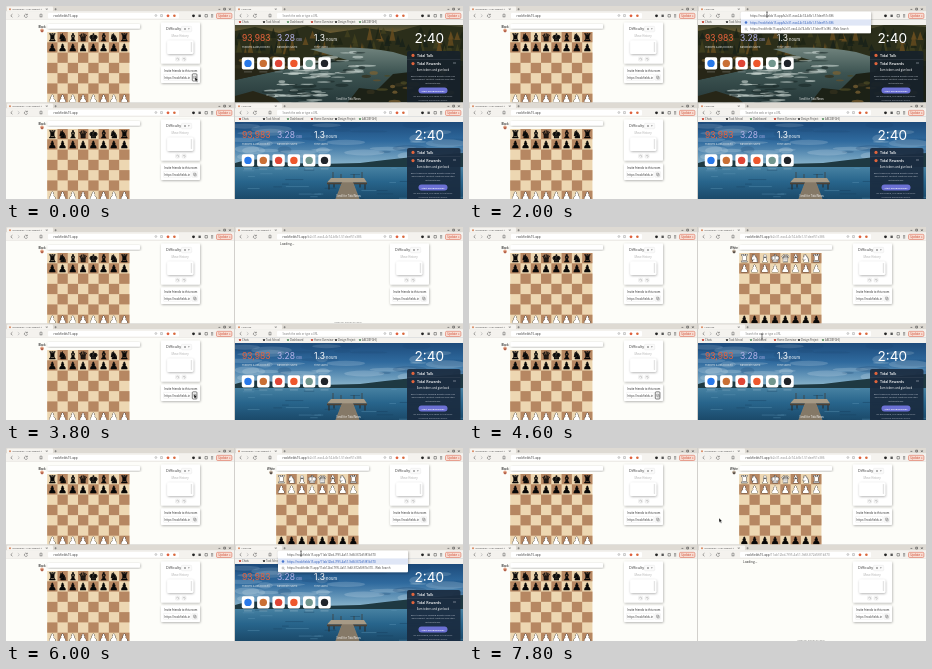
An HTML page that plays this animation: 457 by 193 pixels, repeating every 8000 ms.

```html
<!DOCTYPE html>
<html lang="en">
<head>
<meta charset="utf-8">
<title>Four windows</title>
<style>
html, body { margin: 0; width: 100%; height: 100%; overflow: hidden; background: #fdfdf9; }
svg { display: block; width: 100vw; height: 100vh; }
text { font-family: "Open Sans", "Noto Sans", sans-serif; white-space: pre; }
.stat { font-family: Inter, sans-serif; }
.piece { font-family: "DejaVu Sans", sans-serif; }
</style>
</head>
<body>
<svg id="stage" viewBox="0 0 457 193" preserveAspectRatio="none">
  <defs>
    <clipPath id="frame"><rect width="228" height="96.5"/></clipPath>
    <clipPath id="view"><rect y="13.5" width="228" height="83"/></clipPath>
    <linearGradient id="dusk" x2="0" y2="1">
      <stop offset="0" stop-color="#2c3a35"/><stop offset=".6" stop-color="#5e5430"/><stop offset="1" stop-color="#8a6a30"/>
    </linearGradient>
    <linearGradient id="river" x2="0" y2="1">
      <stop offset="0" stop-color="#70837d"/><stop offset=".4" stop-color="#3d5452"/><stop offset="1" stop-color="#1f3032"/>
    </linearGradient>
    <linearGradient id="sky" x2="0" y2="1">
      <stop offset="0" stop-color="#17406f"/><stop offset=".5" stop-color="#2f6a9e"/><stop offset="1" stop-color="#8db7cd"/>
    </linearGradient>
    <linearGradient id="lake" x2="0" y2="1">
      <stop offset="0" stop-color="#4d87a6"/><stop offset=".4" stop-color="#28658c"/><stop offset="1" stop-color="#143b58"/>
    </linearGradient>
    <filter id="soft" x="-10%" y="-20%" width="120%" height="150%">
      <feDropShadow dx=".5" dy=".8" stdDeviation=".9" flood-opacity=".32"/>
    </filter>
  </defs>
</svg>
<script>
const NS = 'http://www.w3.org/2000/svg';
const stage = document.getElementById('stage');
const LOOP = 8000, STEP = 200;
const SITE = 'rookfields15.app';
const TITLE = 'Rookfields - Play against t';

function el(parent, tag, attrs = {}, content) {
  const node = document.createElementNS(NS, tag);
  for (const key in attrs) node.setAttribute(key, attrs[key]);
  if (content !== undefined) node.textContent = content;
  return parent.appendChild(node);
}
const group = (p, attrs) => el(p, 'g', attrs);
const rect = (p, x, y, width, height, fill, more) => el(p, 'rect', { x, y, width, height, fill, ...more });
const dot = (p, cx, cy, r, fill, more) => el(p, 'circle', { cx, cy, r, fill, ...more });
const blob = (p, cx, cy, rx, ry, fill, opacity) => el(p, 'ellipse', { cx, cy, rx, ry, fill, opacity });
const path = (p, d, fill, more) => el(p, 'path', { d, fill, ...more });
const line = (p, d, stroke, width = 0.5) => path(p, d, 'none', { stroke, 'stroke-width': width });
const text = (p, x, y, size, fill, str, more) => el(p, 'text', { x, y, 'font-size': size, fill, ...more }, str);
const MID = { 'text-anchor': 'middle' };
const show = (node, on) => node.setAttribute('visibility', on ? 'inherit' : 'hidden');

function rng(seed) {
  return () => (seed = (seed * 16807) % 2147483647) / 2147483647;
}

function chrome(p) {
  rect(p, 0, 0, 228, 5.6, '#dedad3');
  rect(p, 1, 0.6, 46, 5, '#f6f4f0', { rx: 1 });
  rect(p, 0, 5.4, 228, 8.2, '#f4f2ee');
  rect(p, 0, 13.4, 228, 0.3, '#d6d4d0');
  dot(p, 4, 3.2, 1, '#d98a62');
  line(p, 'M40 2.4l1.5 1.5m0-1.5l-1.5 1.5M48.5 3.2h2.2m-1.1-1.1v2.2', '#555');
  line(p, 'M212.5 3.4h1.8M217.7 2.2h1.8v1.8h-1.8zM223 2.3l1.8 1.8m0-1.8L223 4.1', '#444', 0.6);
  line(p, 'M6.4 8.2L4.8 9.7l1.6 1.5', '#555', 0.6);
  line(p, 'M11.8 8.2l1.6 1.5-1.6 1.5', '#aaa', 0.6);
  line(p, 'M21 8.6a1.6 1.6 0 1 0 .5 1.6M21.4 7.8v1.2h-1.2M34 8.2h2v3l-1-.8-1 .8z', '#555');
  rect(p, 42, 7, 131, 5.5, '#fff', { rx: 1 });
  line(p, 'M149 9.5a.9.9 0 1 0 1.8 0 .9.9 0 1 0-1.8 0M154.6 8.6h1.8v2h-1.8z', '#777', 0.4);
  dot(p, 162, 9.8, 1.4, '#e0603c');
  dot(p, 168.4, 9.8, 1.3, '#d9683c');
  dot(p, 187.5, 9.8, 1.4, '#222');
  rect(p, 192.5, 8.6, 2.3, 2.4, '#555');
  line(p, 'M199 8.5h2.4v2.5H199zM205 8.6h2.2m-2.2 1.2h2.2M205 11h2.2', '#444', 0.5);
  rect(p, 210.5, 7.3, 15.4, 5.2, '#f8ddd3', { rx: 1.2, stroke: '#d8573c', 'stroke-width': 0.5 });
  text(p, 217.2, 10.9, 2.9, '#cc4028', 'Update', MID);
  dot(p, 223.8, 9.9, 0.5, '#cc4028');
  return {
    title: text(p, 6.4, 4.1, 2.5, '#444', ''),
    url: text(p, 47.5, 10.9, 3.1, '#333', '')
  };
}

function board(p, flip) {
  text(p, 36, 21.6, 2.8, '#222', flip ? 'White' : 'Black', { ...MID, 'font-weight': 600 });
  dot(p, 36, 24.2, 1.8, flip ? '#b8a896' : '#e3a283');
  rect(p, 34.9, 24.2, 2.4, 2, flip ? '#59504a' : '#b2604a', { rx: 0.6 });
  rect(p, 41.5, 18, 92.5, 4.4, '#fff', { rx: 1, filter: 'url(#soft)' });
  const size = 10.28, x0 = 41.2, y0 = 26;
  const back = flip ? '♜♞♝♚♛♝♞♜' : '♜♞♝♛♚♝♞♜';
  rect(p, x0, y0, size * 8, 72, '#edd7b2');
  for (let row = 0; row < 7; row++) {
    for (let col = 0; col < 8; col++) {
      const x = x0 + col * size, y = y0 + row * size;
      if ((row + col) % 2) rect(p, x, y, size, size, '#b68762');
      if (row > 1 && row < 6) continue;
      const white = flip === row < 2;
      text(p, x + size / 2, y + 8.6, row ? 9.8 : 10.4, white ? '#fff' : '#080808', (row ? '♟' : back[col]) + '\uFE0E', {
        ...MID, class: 'piece', stroke: white ? '#222' : '#000', 'stroke-width': white ? 0.55 : 0.3, 'paint-order': 'stroke'
      });
    }
  }
}

function panel(p) {
  rect(p, 155, 16.5, 39, 41, '#fff', { rx: 1, filter: 'url(#soft)' });
  text(p, 160, 24.3, 3.7, '#333', 'Difficulty');
  rect(p, 175.5, 20.3, 10.2, 5.5, '#fafafa', { rx: 1, stroke: '#ddd', 'stroke-width': 0.3 });
  dot(p, 179, 23, 0.8, '#555');
  path(p, 'M181.8 22.4h2l-1 1.2z', '#666');
  text(p, 174, 31.2, 2.8, '#aaa', 'Move History', MID);
  rect(p, 161.2, 34.5, 26, 13.5, '#fff', { rx: 1.5, filter: 'url(#soft)' });
  rect(p, 184.8, 36, 1.3, 10, '#e3e3e3', { rx: 0.6 });
  for (const x of [171.5, 178]) {
    rect(p, x - 2, 51, 4.2, 4.2, '#f8f8f8', { rx: 1, stroke: '#ddd', 'stroke-width': 0.3 });
    line(p, `M${x - 1} 53.4a1.1 1.1 0 1 1 1.2 1`, '#888', 0.4);
  }
  rect(p, 155, 60.5, 39, 16.5, '#fff', { rx: 1, filter: 'url(#soft)' });
  text(p, 174.8, 66, 2.75, '#222', 'Invite friends to this room', MID);
  rect(p, 157.5, 68.4, 27.3, 6, '#fff', { rx: 0.8, stroke: '#ddd', 'stroke-width': 0.3 });
  text(p, 158.5, 72.5, 2.8, '#333', 'https://rookfields.in');
  rect(p, 186, 68.4, 5.6, 6, '#fafafa', { rx: 0.8, stroke: '#ddd', 'stroke-width': 0.3 });
  line(p, 'M187.5 70h2v2.3h-2zM188.3 70.8h2v2.3h-2z', '#777', 0.4);
  return rect(p, 186.3, 67.8, 4.6, 7.2, 'none', { rx: 0.8, stroke: '#333', 'stroke-width': 0.6 });
}

function riverPhoto(p) {
  rect(p, 0, 13, 228, 92, '#1d241a');
  rect(p, 0, 13, 228, 19, 'url(#dusk)');
  path(p, 'M0 25L20 21 44 27 72 20 95 27 130 22 160 26 190 18 228 21V55H0z', '#2b2e1a');
  const rand = rng(71);
  for (let i = 0; i < 80; i++) {
    const x = rand() * 228, y = 20 + rand() * 22, h = 6 + rand() * 9;
    path(p, `M${x} ${y}l3 ${h}h-6z`, ['#1c2415', '#41401f', '#6a4e20', '#17211a'][i % 4], { opacity: 0.8 });
  }
  path(p, 'M75 43Q120 39 158 46L185 54 174 70 150 105H0V74L45 64 112 54z', 'url(#river)');
  for (let i = 0; i < 80; i++) {
    const y = 46 + rand() * 56, x = Math.max(0, 88 - (y - 44) * 1.3) + rand() * 70;
    blob(p, x, y, 3 + rand() * 8, 0.5 + rand() * 1.3, i % 3 ? '#c3cfcb' : '#1d2b2a', 0.65);
  }
  path(p, 'M0 47Q35 45 60 54L78 57 42 65 0 74zM0 90l18-5 22 7 14 13H0z', '#272617');
  path(p, 'M106 105l18-23 18 2 16-16 70-8v45z', '#1c2116');
  for (let i = 0; i < 36; i++) {
    const left = i % 3 === 0;
    blob(p, left ? rand() * 55 : 125 + rand() * 90, left ? 50 + rand() * 12 : 66 + rand() * 34,
      2 + rand() * 4, 0.8 + rand() * 1.6, ['#66502a', '#33301c', '#4c4a24', '#7b6232'][i % 4], 0.75);
  }
}

function lakePhoto(p) {
  rect(p, 0, 13, 228, 50, 'url(#sky)');
  const rand = rng(19);
  for (let i = 0; i < 45; i++) {
    const y = 22 + rand() * 34;
    blob(p, rand() * 228, y, 6 + rand() * 16, 1 + rand() * 3, i % 3 ? '#cfdfe8' : '#173f69', 0.08 + y / 300);
  }
  rect(p, 0, 61, 228, 44, 'url(#lake)');
  path(p, 'M0 60Q15 55 32 57L56 60 85 61 125 60 150 57 178 54 228 50V64H0z', '#1e3942');
  for (let i = 0; i < 45; i++) {
    line(p, `M${rand() * 220} ${65 + rand() * 38}h${5 + rand() * 18}`, i % 2 ? '#5c93b3' : '#153e5c', 0.4);
  }
  // Jetty: a wide deck on posts with a walkway towards the viewer.
  path(p, 'M94 80.5v6M99 80.5v4M125 80.5v4M130 80.5v6', 'none', { stroke: '#2b2722', 'stroke-width': 1 });
  path(p, 'M96 75h33l3 4.5H92z', '#a69a86');
  rect(p, 92, 79.5, 40, 1.8, '#4b4136');
  path(p, 'M107 79h11l10 26H97z', '#8f8270');
  for (let i = 0; i < 11; i++) {
    const y = 81 + i * 2, w = 5.8 + i * 0.8;
    line(p, `M${112.5 - w} ${y}h${w * 2}`, '#5c5144', 0.4);
  }
  line(p, 'M98 75v-6M127 75v-6M106 75v-4M119 75v-4', '#40382f', 0.7);
}

function newTab(p, photo, glass) {
  const page = group(p);
  photo(p.insertBefore(group(p), page));
  const stats = [
    [7, '93,983', '', '#e8623c', 'Trackers & ads blocked'],
    [42, '3.28', 'GB', '#b4b2ea', 'Bandwidth saved'],
    [79, '1.3', 'hours', '#fff', 'Time saved']
  ];
  for (const [x, value, unit, fill, label] of stats) {
    const t = text(page, x, 34.6, 8.5, fill, value, { class: 'stat' });
    el(t, 'tspan', { 'font-size': 4.1 }, ' ' + unit);
    text(page, x, 42, 2.5, '#e6eaea', label, { class: 'stat' });
  }
  text(page, 179.5, 36.8, 13.6, '#fff', '2:40', { class: 'stat' });

  const colors = ['#2878e8', '#c96f34', '#de4536', '#ee572c', '#71968e', '#20242a'];
  colors.forEach((fill, i) => {
    const x = 13 + i * 15.3;
    rect(page, x - 6.2, 51.2, 12.4, 12.4, '#fff', { rx: 1.8 });
    dot(page, x, 57.4, 3.7, fill);
    rect(page, x - 4, 65.5, 8, 0.8, '#fff', { opacity: 0.3 });
  });
  text(page, 113.5, 94, 2.6, '#fff', 'Scroll for Tidal News', MID);

  rect(page, 172, 45, 53.5, 53, glass, { rx: 2, opacity: 0.93 });
  rect(page, 172, 53.3, 53.5, 0.3, '#4a5566');
  dot(page, 178, 49.4, 1.6, '#e0643c');
  text(page, 182, 50.7, 3.6, '#fff', 'Tidal Talk', { 'font-weight': 600 });
  dot(page, 178, 57.6, 1.6, '#e0643c');
  text(page, 182, 58.9, 3.6, '#fff', 'Tidal Rewards', { 'font-weight': 600 });
  line(page, 'M218 57h3', '#c9cfd8');
  const centred = (y, size, fill, str) => text(page, 198, y, size, fill, str, MID);
  centred(65.4, 2.7, '#fff', 'Earn tokens and give back');
  ['Earn tokens by viewing private Tidal Ads', 'and support content creators and sites', 'automatically.'].forEach(
    (s, i) => centred(70.6 + i * 3.6, 2.4, '#c0c8d2', s));
  rect(page, 183.5, 81.6, 29, 6, '#6b70d4', { rx: 3 });
  text(page, 198, 85.5, 2.4, '#fff', 'Start using Rewards', { ...MID, 'font-weight': 600 });
  ['By proceeding, you agree to the terms', 'of service and privacy policy.'].forEach(
    (s, i) => centred(91.4 + i * 3.2, 2.2, '#b0b8c4', s));
  return page;
}

function bookmarks(p) {
  rect(p, 0, 13.5, 228, 5.5, '#f4f2ee');
  ['Chats', 'Task School', 'Dashboard', 'Home Overview', 'Design Project', 'ABCDEFGHIJ'].forEach((s, i) => {
    const x = 5 + i * 24;
    rect(p, x - 1, 15, 2, 2, ['#c94d3f', '#444', '#6a9c72'][i % 3], { rx: 0.4 });
    text(p, x + 2, 17.3, 2.6, '#444', s);
  });
}

function dropdown(p, link) {
  rect(p, 43, 5.8, 130, 21.5, '#fff', { rx: 1, filter: 'url(#soft)' });
  rect(p, 43, 13.4, 130, 6.2, '#dfe6f6');
  text(p, 52, 10.9, 2.9, '#444', link);
  dot(p, 48, 16.5, 1.3, '#4776d0');
  text(p, 52, 17.5, 2.9, '#2758b8', link);
  line(p, 'M47 23a1 1 0 1 0 2 0 1 1 0 1 0-2 0m1.8.8l.9.9', '#666', 0.4);
  text(p, 52, 24, 2.8, '#444', link + ' - Web Search');
}

function win(x, y) {
  const p = group(stage, { transform: `translate(${x} ${y})`, 'clip-path': 'url(#frame)' });
  rect(p, 0, 0, 228, 97, '#fdfdf9');
  return p;
}

function hostWindow(y) {
  const p = win(0, y);
  board(p, false);
  const focus = panel(p);
  const bar = chrome(p);
  bar.title.textContent = TITLE;
  bar.url.textContent = SITE;
  return focus;
}

// Guest window: start page, pasted link, pending, loading, then the game.
function guestWindow(y, photo, glass, room, times) {
  const p = win(229, y);
  const start = group(p, { 'clip-path': 'url(#view)' });
  const content = newTab(start, photo, glass);
  const page = group(p), game = group(page);
  board(game, true);
  show(panel(page), false);
  const loading = group(p);
  text(loading, 45, 17.7, 3.2, '#333', 'Loading...');
  text(loading, 113, 96, 2.3, '#777', 'Made for friends of chess', MID);
  const bar = chrome(p);
  const marks = group(p);
  bookmarks(marks);
  const menu = group(p);
  dropdown(menu, `https://${SITE}/${room}`);
  const [paste, enter, load, ready] = times;

  return t => {
    const sent = t >= enter, opened = t >= load;
    content.setAttribute('transform', `translate(0 ${sent ? -6 : 0})`);
    show(start, !opened);
    show(marks, !sent);
    show(menu, t >= paste && !sent);
    show(page, opened);
    game.style.display = t >= ready ? '' : 'none';
    show(loading, opened && t < ready);
    bar.title.textContent = sent ? TITLE : 'New Tab';
    bar.url.textContent = sent ? SITE : 'Search the web or type a URL';
    bar.url.setAttribute('fill', sent ? '#333' : '#777');
    bar.url.setAttribute('font-size', sent ? 3.1 : 2.6);
    if (sent) el(bar.url, 'tspan', { fill: '#888' }, '/' + room);
  };
}

const focusTop = hostWindow(0);
const focusBottom = hostWindow(97);
const guests = [
  guestWindow(0, riverPhoto, '#17222a', 'b2c31-eac4-4c74-b3b1-51deef51c386', [1400, 2400, 3400, 4200]),
  guestWindow(97, lakePhoto, '#1a2c40', '11ab12bd-7f95-4a51-9d6f-872d5f81b370', [5200, 6200, 7000, LOOP])
];
rect(stage, 228, 0, 1, 193, '#d2d0cc');
rect(stage, 0, 96.5, 457, 0.5, '#c9c7c2');

const pointer = group(stage);
const arrow = path(pointer, 'M0 0v4.5l1.1-1 .8 1.8.8-.4-.8-1.7h1.4z', '#111', { stroke: '#fff', 'stroke-width': 0.35 });
const caret = line(pointer, 'M-.9 0h1.8M0 0v5M-.9 5h1.8', '#222', 0.6);
const stops = [
  [0, 189, 71], [200, 189, 71], [800, 298, 6], [2400, 298, 6], [3000, 189, 167],
  [3800, 188, 167], [4600, 293, 107], [5000, 295, 103], [6600, 295, 103], [7600, 250, 70], [8000, 250, 70]
];

function pointerAt(t) {
  const i = stops.findIndex(s => s[0] > t);
  const [t0, x0, y0] = stops[i - 1], [t1, x1, y1] = stops[i];
  const k = (t - t0) / (t1 - t0), e = k * k * (3 - 2 * k);
  return [x0 + (x1 - x0) * e, y0 + (y1 - y0) * e];
}

function draw(t) {
  guests.forEach(update => update(t));
  show(focusTop, t < 600);
  show(focusBottom, t >= 3200 && t < 5000);
  const [x, y] = pointerAt(t);
  const inField = x > 271 && x < 402 && y % 97 < 12;
  show(arrow, !inField);
  show(caret, inField);
  pointer.setAttribute('transform', `translate(${x} ${y})`);
}

let last = -1;
const begin = performance.now();
function tick() {
  const t = Math.floor(((performance.now() - begin) % LOOP) / STEP) * STEP;
  if (t !== last) draw(last = t);
  requestAnimationFrame(tick);
}
tick();
</script>
</body>
</html>
```
